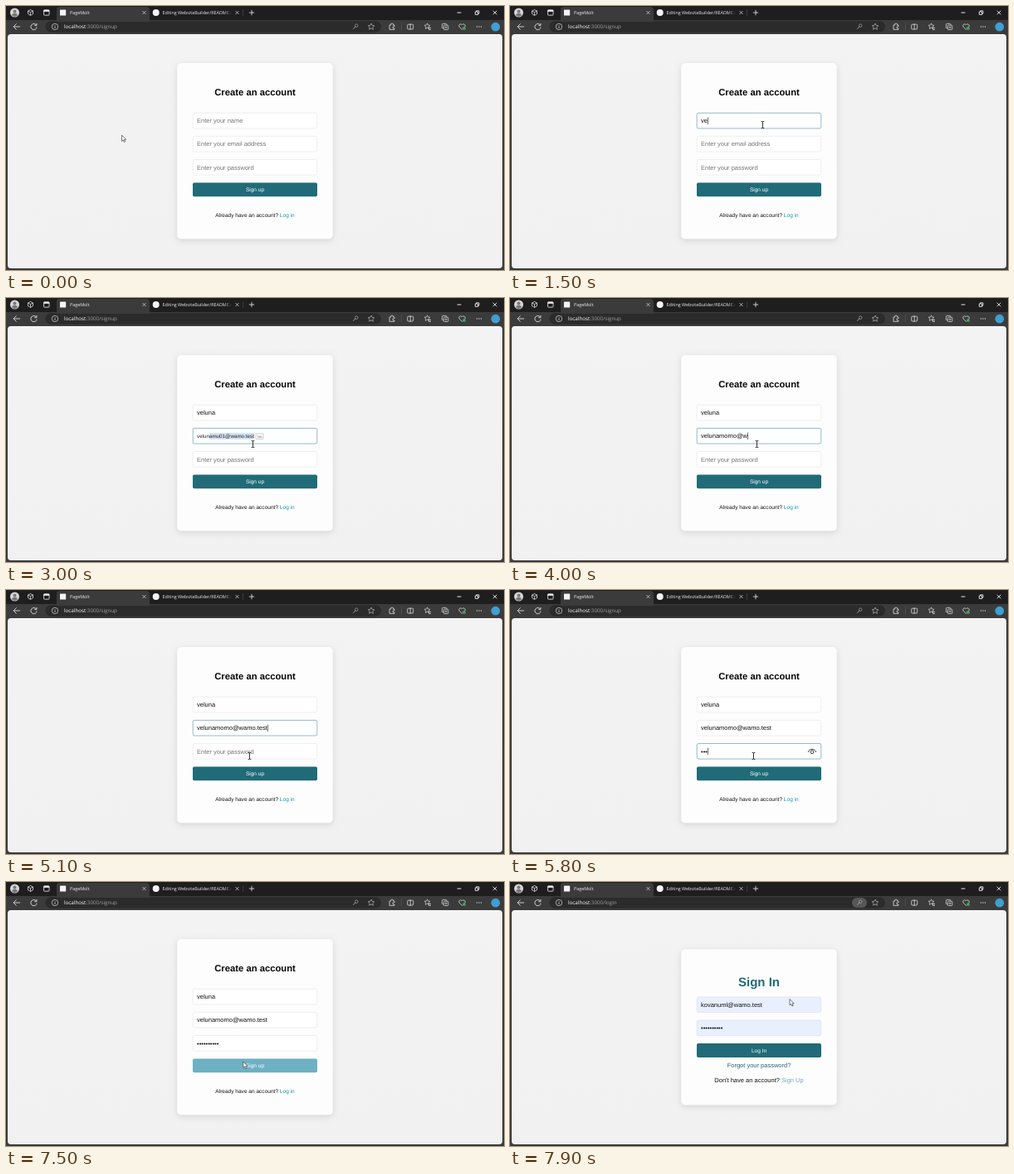
An HTML page with a canvas that plays this animation: 600 px wide and 319 px high, repeating every 8 s.

```html
<!DOCTYPE html>
<html lang="en">
<head>
<meta charset="utf-8">
<title>Sign up</title>
<style>
html, body { margin: 0; width: 100%; height: 100%; overflow: hidden; background: #3b3b3b; }
canvas { display: block; width: 600px; height: 319px; }
</style>
</head>
<body>
<canvas id="stage"></canvas>
<script>
const W = 600, H = 319, LOOP = 8000, STEP = 100;
const canvas = document.getElementById('stage');
const ctx = canvas.getContext('2d');
const ratio = window.devicePixelRatio || 1;
canvas.width = W * ratio;
canvas.height = H * ratio;
ctx.scale(ratio, ratio);
ctx.textRendering = 'geometricPrecision';

const SANS = '"Liberation Sans", Arial, sans-serif';
const UI = '"Open Sans", "Noto Sans", sans-serif';
const TEAL = '#206b77', HOVER = '#6eb0c4', FOCUS = '#7ea9bb';
const NAME = 'veluna';
const EMAIL = NAME + 'momo@wamo.test';
const SUGGESTED = NAME + 'mu01@wamo.test';
const LOGIN_EMAIL = 'kovanuml@wamo.test';

// [time, value] pairs; the value holds until the next time
const nameKeys = [[1300, 1], [1500, 2], [1600, 3], [1700, 4], [1800, 6]];
const mailKeys = [[2600, 1], [2700, 2], [2800, 3], [2900, 4], [3000, 5], [3200, 6], [3400, 7],
  [3600, 8], [3700, 10], [3800, 11], [4000, 12], [4100, 13], [4200, 14], [4300, 15],
  [4400, 16], [4500, 17], [4700, 18], [4900, 20]];
const passKeys = [[5500, 1], [5600, 2], [5800, 3], [5900, 4], [6100, 5], [6300, 6],
  [6500, 7], [6600, 8], [6700, 9], [6800, 10]];
const focusKeys = [[1200, 1], [2300, 2], [5300, 3], [7300, 0]];
// time, x, y
const pointer = [[400, 139.5, 156], [1200, 304.5, 143.5], [1900, 304.5, 143.5], [2400, 297.5, 176.5],
  [5000, 297.5, 176.5], [5100, 293.5, 200.5], [6600, 293.5, 200.5], [6900, 288, 207.5],
  [7300, 285.8, 217], [7500, 285.8, 217], [7900, 337, 141.5]];

const held = (keys, t) => keys.reduce((v, [at, value]) => t >= at ? value : v, 0);

function pointerAt(t) {
  let a = pointer[0];
  for (const b of pointer) {
    if (t <= b[0]) {
      const p = b[0] > a[0] ? Math.max(0, (t - a[0]) / (b[0] - a[0])) : 0;
      const k = p * p * (3 - 2 * p);
      return [a[1] + (b[1] - a[1]) * k, a[2] + (b[2] - a[2]) * k];
    }
    a = b;
  }
  return [a[1], a[2]];
}

function text(s, x, y, size, color, { font = SANS, weight = 400, align = 'left' } = {}) {
  ctx.font = `${weight} ${size}px ${font}`;
  ctx.textAlign = align;
  ctx.fillStyle = color;
  ctx.fillText(s, x, y);
  return ctx.measureText(s).width;
}

function box(x, y, w, h, r, fill, stroke, line = 0.5) {
  ctx.beginPath();
  ctx.roundRect(x, y, w, h, r);
  if (fill) { ctx.fillStyle = fill; ctx.fill(); }
  if (stroke) { ctx.strokeStyle = stroke; ctx.lineWidth = line; ctx.stroke(); }
}

function disc(x, y, r, fill, stroke, line = 0.7) {
  ctx.beginPath();
  ctx.arc(x, y, r, 0, 7);
  if (fill) { ctx.fillStyle = fill; ctx.fill(); }
  if (stroke) { ctx.strokeStyle = stroke; ctx.lineWidth = line; ctx.stroke(); }
}

function path(d, x, y, color, line = 0.8, fill) {
  const p = new Path2D(d);
  ctx.save();
  ctx.translate(x, y);
  if (fill) { ctx.fillStyle = fill; ctx.fill(p); }
  if (color) { ctx.strokeStyle = color; ctx.lineWidth = line; ctx.stroke(p); }
  ctx.restore();
}

function star(x, y, r, color) {
  let d = '';
  for (let i = 0; i < 10; i++) {
    const a = Math.PI * (i / 5 - 0.5), q = i % 2 ? r * 0.48 : r;
    d += `${i ? 'L' : 'M'}${q * Math.cos(a)} ${q * Math.sin(a)}`;
  }
  path(d + 'Z', x, y, color, 0.7);
}

const CROSS = 'M-2-2L2 2M2-2L-2 2';

function drawTabs() {
  ctx.fillStyle = '#1e1e1e';
  ctx.fillRect(0, 0, W, 17);
  disc(10.5, 8, 5.5, '#d6d6d6');
  disc(10.5, 6.4, 1.9, '#777');
  path('M-3.4 3.2Q-3 0 0 0T3.4 3.2Q0 5.4-3.4 3.2', 10.5, 8.6, null, 0, '#777');
  path('M-3-2L0-3.6L3-2V1.6L0 3.4L-3 1.6ZM-3-2L0-.4L3-2M0-.4V3.4', 29.5, 8, '#ddd');
  box(45.5, 4.8, 6.6, 6.4, 1, null, '#eee', 0.8);
  ctx.fillStyle = '#eee';
  ctx.fillRect(45.5, 4.8, 6.6, 2);

  box(61, 1, 112, 18, [4, 4, 0, 0], '#3b3b3b');
  box(65, 4.4, 7.2, 7.2, 0.5, '#f4f4f4');
  text('PageMolt', 77, 10, 5.4, '#f2f2f2', { font: UI });
  path(CROSS, 166.5, 8, '#ddd', 0.7);

  disc(180.7, 8, 4, '#f4f4f4');
  const fade = ctx.createLinearGradient(262, 0, 273, 0);
  fade.addColorStop(0, '#eee');
  fade.addColorStop(1, '#1e1e1e');
  text('Editing WebsiteBuilder/README.r', 188.5, 10, 5.4, fade, { font: UI });
  path(CROSS, 278.5, 8, '#ddd', 0.7);
  ctx.fillStyle = '#555';
  ctx.fillRect(285.5, 4, 0.6, 8);
  path('M-3.2 0H3.2M0-3.2V3.2', 296, 8, '#eee', 0.8);

  path('M-2.4 0H2.4', 546, 8, '#fff', 0.9);
  path('M-2.2-1H1.2V2.4H-2.2ZM-1-1V-2.2H2.4V1.2H1.2', 567.5, 8, '#fff', 0.8);
  path('M-2.3-2.3L2.3 2.3M2.3-2.3L-2.3 2.3', 589, 8, '#fff', 0.8);
}

function drawToolbar(login) {
  const ink = '#dcdcdc';
  ctx.fillStyle = '#3b3b3b';
  ctx.fillRect(0, 17, W, H - 17);
  path('M4 0H-3.8M-.4-3.6L-4 0L-.4 3.6', 13, 25, ink, 0.9);
  path('M3.2-1.6A3.6 3.6 0 1 0 3.6 .6M3.4-4V-1.4H.8', 33.5, 25, ink, 0.9);
  box(47.5, 18.2, 404.5, 13.6, 6.8, '#2b2b2b');
  disc(59, 25, 3.7, null, ink);
  path('M0-.6V2M0-2V-1.3', 59, 25, ink, 0.8);
  const w = text('localhost', 70, 27.2, 6.25, '#fff', { font: UI });
  text(':3000/' + (login ? 'login' : 'signup'), 70 + w, 27.2, 6.25, '#a2a2a2', { font: UI });

  if (login) box(412, 19, 18, 12, 6, '#575757');
  disc(422.2, 23.7, 1.8, null, '#aaa');
  path('M-1.2 1.2L-4 4', 422.2, 23.7, '#aaa', 0.9);
  star(440, 25, 4, '#bbb');
  path('M-3-2H-1.2A1.4 1.4 0 1 1 1.4-2H3V0A1.3 1.3 0 1 0 3 2V3.4H-3Z', 465, 25, ink);
  ctx.fillStyle = '#5a5a5a';
  ctx.fillRect(476, 20.5, 0.6, 9);
  box(483.7, 22.2, 7, 5.8, 1, null, ink, 0.8);
  path('M0-3.6V3.8', 487.2, 25, ink, 0.8);
  star(507.5, 24.5, 3.6, ink);
  path('M0 1.4H4M1 3.4H4', 508, 25, ink, 0.8);
  box(525.4, 21.4, 5.4, 5.4, 1, null, ink, 0.8);
  box(527.4, 23.2, 5.4, 5.4, 1, '#3b3b3b', ink, 0.8);
  path('M-1.4 0H1.4M0-1.4V1.4', 530.1, 25.9, ink, 0.7);
  path('M0 3.4L-3.4 0C-4.8-2.2-1.6-4.6 0-2C1.6-4.6 4.8-2.2 3.4 0Z', 549.5, 25, ink);
  disc(552, 27, 1.9, '#3da35d');
  [-2.5, 0, 2.5].forEach(d => disc(570 + d, 25, 0.65, ink));
  disc(589.8, 25.2, 5.4, '#3d9fd3');
}

function card(y, h) {
  ctx.save();
  ctx.shadowColor = 'rgba(0,0,0,.12)';
  ctx.shadowBlur = 7 * ratio;
  ctx.shadowOffsetY = 2 * ratio;
  box(206.2, y, 187.5, h, 4.7, '#fdfdfd');
  ctx.restore();
}

function field(y, { value = '', hint = '', focused, caret = focused, fill = '#fff', edge = '#e2e2e2' }) {
  box(225.2, y, 149.6, 18.6, 1.8, fill, focused ? FOCUS : edge, focused ? 0.8 : 0.55);
  const w = value ? text(value, 230, y + 12, 7.5, '#111') : 0;
  if (!value) text(hint, 230, y + 12, 7.5, '#757575');
  if (caret) {
    ctx.fillStyle = '#111';
    ctx.fillRect(230 + w + 0.2, y + 5.2, 0.6, 8.4);
  }
}

function button(label, y, fill) {
  box(225, y, 150, 16.8, 1.9, fill);
  text(label, 300, y + 10.7, 6.56, '#fff', { align: 'center' });
}

// Black text followed by a coloured link, centred as one line
function linkLine(lead, link, y, size, color) {
  ctx.font = `400 ${size}px ${SANS}`;
  const x = 300 - ctx.measureText(lead + link).width / 2;
  const w = text(lead, x, y, size, '#111');
  text(link, x + w, y, size, color);
}

function suggestion(typed) {
  ctx.font = `400 6.25px ${SANS}`;
  const from = ctx.measureText(SUGGESTED.slice(0, typed)).width;
  const full = ctx.measureText(SUGGESTED).width;
  ctx.fillStyle = '#d5e3f3';
  ctx.fillRect(230 + from, 163, full - from, 8);
  text(SUGGESTED, 230, 169.2, 6.25, '#222');
  box(232 + full, 163.7, 9.4, 6.8, 1.2, '#f7f7f7', '#aaa');
  text('Tab', 236.7 + full, 168.5, 3.8, '#777', { align: 'center', font: UI });
}

function eye(x, y) {
  path('M-4.8 1.2C-3.4-3.6 3.4-3.6 4.8 1.2', x, y, '#222', 0.9);
  disc(x, y + 1, 1.9, null, '#222', 0.9);
}

function drawSignup(t) {
  const focus = held(focusKeys, t);
  const mail = held(mailKeys, t), pass = held(passKeys, t);
  const suggesting = mail > 0 && mail < 7;
  card(69, 212.5);
  text('Create an account', 300, 107.6, 11.25, '#080808', { weight: 700, align: 'center' });
  field(129.3, { value: NAME.slice(0, held(nameKeys, t)), hint: 'Enter your name', focused: focus === 1 });
  field(157.4, {
    value: suggesting ? '' : EMAIL.slice(0, mail),
    hint: suggesting ? '' : 'Enter your email address',
    focused: focus === 2, caret: focus === 2 && !suggesting
  });
  if (suggesting) suggestion(mail);
  field(185.5, {
    value: '•'.repeat(pass), hint: 'Enter your password',
    focused: focus === 3, caret: focus === 3 && t < 6900
  });
  if (focus === 3 && pass) eye(364, 194.8);
  button('Sign up', 213.4, t >= 7100 ? HOVER : TEAL);
  linkLine('Already have an account? ', 'Log in', 255, 6.56, '#1596ab');
}

function drawLogin() {
  const filled = { fill: '#e8f0fe', edge: '#d4dbe8' };
  card(81.3, 188.2);
  text('Sign In', 300, 126.2, 15, TEAL, { weight: 700, align: 'center' });
  field(138.9, { value: LOGIN_EMAIL, ...filled });
  field(167.1, { value: '•'.repeat(10), ...filled });
  button('Log In', 195.1, TEAL);
  text('Forgot your password?', 300, 223.5, 7.5, TEAL, { align: 'center' });
  linkLine("Don't have an account? ", 'Sign Up', 241.6, 7.5, '#6fabbd');
}

function drawPointer(t) {
  const [x, y] = pointerAt(t);
  const overField = x > 225 && x < 375 && [129, 157, 185].some(top => y > top && y < top + 20);
  if (overField && t < 7500) {
    const beam = 'M-1.8-4H-.5L0-3.6L.5-4H1.8M0-3.6V3.6M-1.8 4H-.5L0 3.6L.5 4H1.8';
    path(beam, x, y, '#222', 0.9);
  } else {
    path('M0 0V7.4L1.7 5.9L2.9 8.5L4.1 8L2.9 5.4H5.2Z', x, y, '#333', 0.65, '#fff');
  }
}

function draw(t) {
  const login = t >= 7700;
  drawToolbar(login);
  drawTabs();
  const page = ctx.createLinearGradient(0, 34, 0, 317);
  page.addColorStop(0, '#f3f3f3');
  page.addColorStop(1, '#f1f1f2');
  box(2, 34, 596, 283, 4, page);
  if (login) drawLogin(); else drawSignup(t);
  drawPointer(t);
}

const start = performance.now();
function tick() {
  const t = (performance.now() - start) % LOOP;
  draw(Math.floor(t / STEP) * STEP);
  requestAnimationFrame(tick);
}
tick();
</script>
</body>
</html>
```
